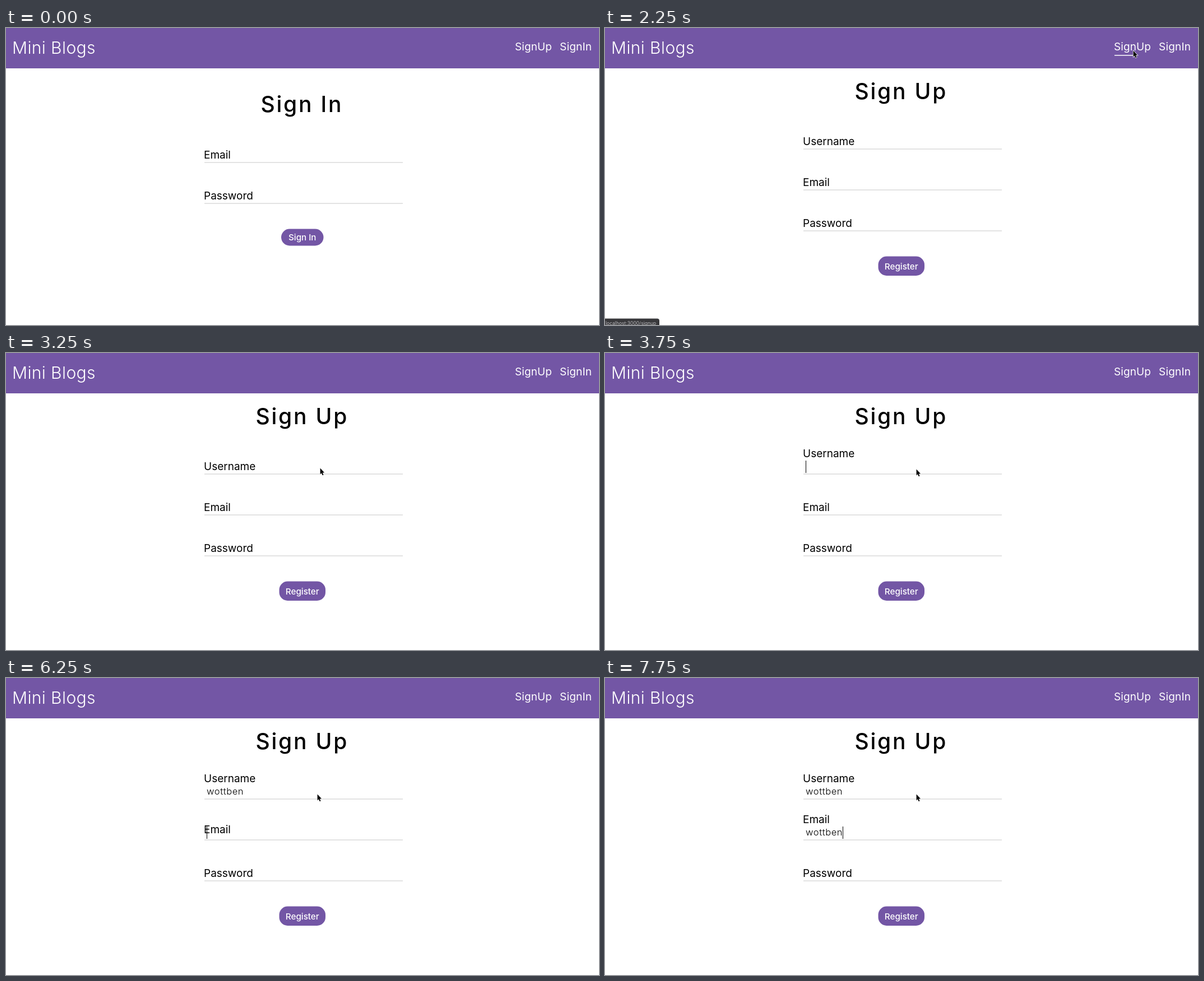
An HTML page with a canvas for the animation above (8000 ms loop, 1058 by 530 pixels).

```html
<!DOCTYPE html>
<html lang="en">
<head>
<meta charset="utf-8">
<title>Mini Blogs</title>
<style>
  html, body { margin: 0; width: 100%; height: 100%; overflow: hidden; background: #fff; }
  canvas { display: block; }
</style>
</head>
<body>
<canvas id="stage" width="1058" height="530"></canvas>
<script>
const ctx = document.getElementById('stage').getContext('2d');
const LOOP = 8000, STEP = 250;
const PURPLE = '#7356a5';
const NAME = 'wottben';

// [time, tip x, tip y]
const POINTER = [
  [500, 924, 66], [750, 933, 55], [1000, 942, 40], [2750, 676, 140],
  [3000, 567, 187], [3250, 560, 205], [3750, 555, 207]
];

// Fields of the sign-up form; keys are [time, characters typed]
const SIGN_UP = [
  { label: 'Username', y: 216, focus: 3315, blur: 6205, keys: [[4500, 2], [4750, 4], [5500, 6], [5750, 7]] },
  { label: 'Email', y: 289, focus: 6205, blur: LOOP, keys: [[7000, 2], [7250, 4], [7500, 5], [7750, 7]] },
  { label: 'Password', y: 362, focus: LOOP, blur: LOOP, keys: [] }
];
const SIGN_IN = [{ label: 'Email', y: 240 }, { label: 'Password', y: 313 }];

const latest = (list, t) => list.filter(item => item[0] <= t).pop();

// CSS "ease": cubic-bezier(.25, .1, .25, 1)
function ease(x) {
  if (x <= 0) return 0;
  if (x >= 1) return 1;
  const bezier = (s, a, b) => 3 * (1 - s) * s * ((1 - s) * a + s * b) + s ** 3;
  let low = 0, high = 1;
  for (let i = 0; i < 20; i++) {
    const mid = (low + high) / 2;
    if (bezier(mid, .25, .25) < x) low = mid; else high = mid;
  }
  return bezier(low, .1, 1);
}
const ramp = (t, start, duration) => ease((t - start) / duration);

function text(string, x, y, size, { weight = 400, color = '#000', spacing = 0, align = 'left' } = {}) {
  ctx.font = `${weight} ${size}px Inter, sans-serif`;
  ctx.letterSpacing = spacing + 'px';
  ctx.textAlign = align;
  ctx.fillStyle = color;
  ctx.fillText(string, x, y);
  return ctx.measureText(string).width;
}

function rect(x, y, w, h, color, radius = 0) {
  ctx.fillStyle = color;
  ctx.beginPath();
  ctx.roundRect(x, y, w, h, radius);
  ctx.fill();
}

function header(t) {
  rect(0, 0, 1058, 72, PURPLE);
  text('Mini Blogs', 11, 46, 30, { weight: 300, color: '#fff', spacing: .4 });
  text('SignUp', 908, 40, 19, { color: '#fff', spacing: .1 });
  text('SignIn', 988, 40, 19, { color: '#fff', spacing: .2 });
  const underline = 64.5 * (ramp(t, 2116, 400) - ramp(t, 2742, 540));
  if (underline > .5) rect(909, 48, underline, 1.6, '#fff');
}

function heading(string, x, y) {
  text(string, x, y, 39, { weight: 500, spacing: 2.8 });
}

function button(label, x, y, w, h, baseline) {
  rect(x, y, w, h, PURPLE, 15);
  text(label, x + w / 2, baseline, 15.2, { weight: 500, color: '#fff', align: 'center' });
}

function field({ label, y, focus = LOOP, blur = LOOP, keys = [] }, t) {
  rect(354, y - .4, 354, 1, '#c8c8c8');
  text(label, 353, y - 7.5 - 22.5 * ramp(t, focus, 300), 19);
  if (t < focus) return;
  const [edited, count] = latest(keys, t) || [focus, 0];
  const width = text(NAME.slice(0, count), 358, y - 8, 16.5, { weight: 300, spacing: .6 });
  const caretOn = t < blur && (t - edited) % 1000 < 500;
  if (caretOn) rect(Math.round(358 + width), y - 24, 1, 22, '#000');
}

function statusBar(t) {
  if (t < 2250 || t >= 3250) return;
  ctx.globalAlpha = t < 3000 ? 1 : .78;
  rect(-1, 518.5, 98, 14, '#38383b', [0, 4, 0, 0]);
  text('localhost:3000/signup', 1, 529.5, 8.5, { color: '#b9b9bd' });
  ctx.globalAlpha = 1;
}

function pointer(t) {
  const spot = latest(POINTER, t);
  if (!spot) return;
  const arrow = new Path2D('M.6 .6V11.4L2.9 9.2L4.7 13.2L6.5 12.4L4.8 8.5H8.1Z');
  ctx.save();
  ctx.translate(spot[1], spot[2]);
  ctx.strokeStyle = '#fff';
  ctx.lineWidth = 1.4;
  ctx.stroke(arrow);
  ctx.fillStyle = '#000';
  ctx.fill(arrow);
  ctx.restore();
}

function draw(now) {
  const t = Math.floor(now % LOOP / STEP) * STEP;
  rect(0, 0, 1058, 530, '#fff');
  header(t);
  if (t < 2250) {
    heading('Sign In', 454.5, 150);
    SIGN_IN.forEach(item => field(item, t));
    button('Sign In', 491, 358.5, 75.5, 30, 379.3);
  } else {
    heading('Sign Up', 445.5, 126.5);
    SIGN_UP.forEach(item => field(item, t));
    button('Register', 487.5, 407.5, 82.5, 34.5, 430.5);
  }
  statusBar(t);
  pointer(t);
  requestAnimationFrame(() => draw(performance.now()));
}
draw(performance.now());
</script>
</body>
</html>
```
